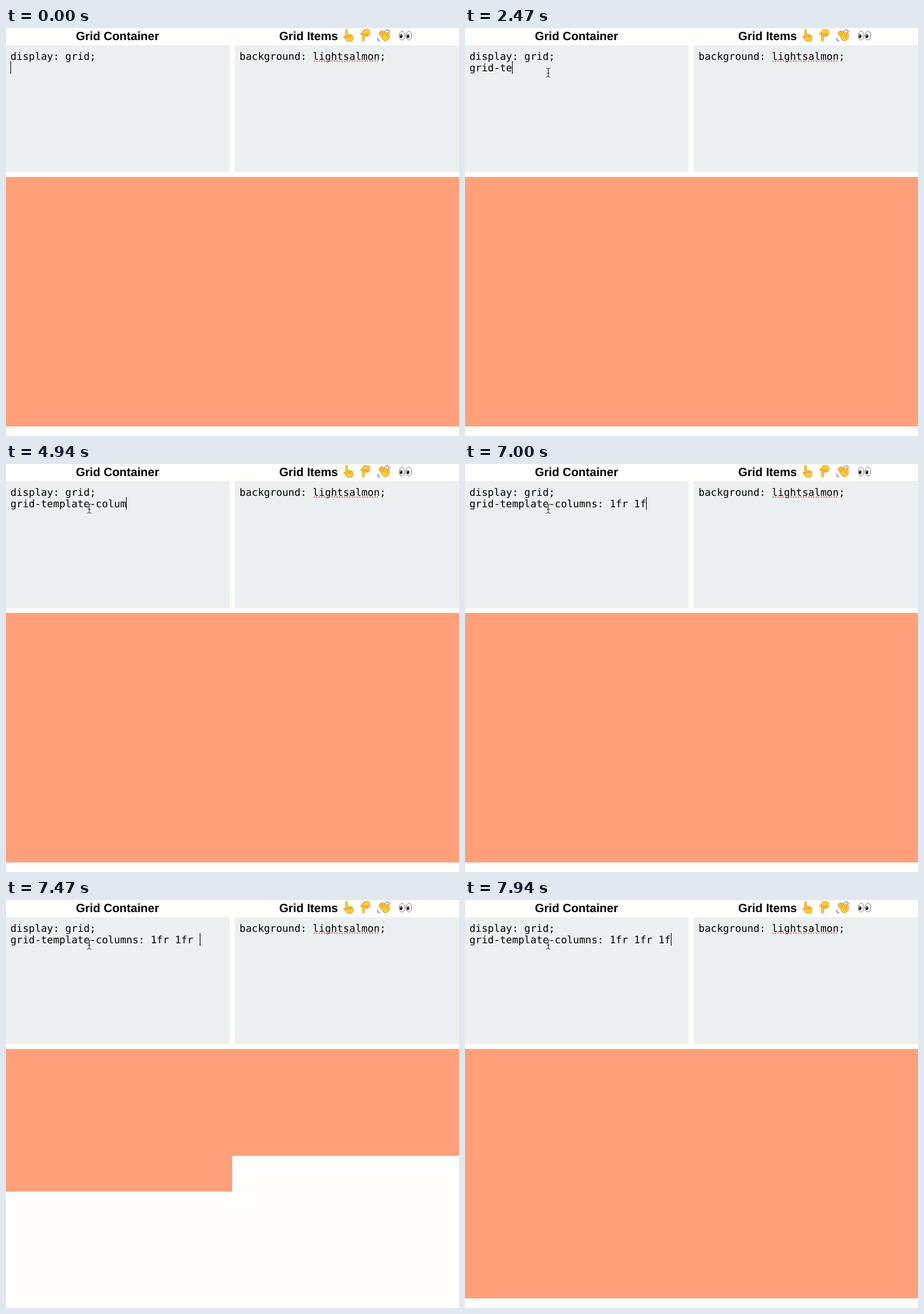
Animation of 713 by 641 pixels, one loop 8 s. Source, as an HTML page:

```html
<!DOCTYPE html>
<html lang="en">
<head>
<meta charset="utf-8">
<title>Grid playground</title>
<style>
  html, body { margin: 0; width: 100%; height: 100%; overflow: hidden; background: #fffefd; }
  svg { display: block; }
  text { white-space: pre; text-rendering: geometricPrecision; }
  .title { font: bold 18.72px "Liberation Sans", Arial, sans-serif; }
  .code { font: 15.95px "DejaVu Sans Mono", monospace; }
  .pane { fill: #ecf0f1; }
  .hand { fill: #fdc83f; stroke: #dc9a31; stroke-width: .8; stroke-linejoin: round; }
  .crease { fill: none; stroke: #c98226; stroke-width: .8; stroke-linecap: round; }
  .wave { fill: none; stroke: #6b7f8c; stroke-width: 1; stroke-linecap: round; }
</style>
</head>
<body>
<svg width="713" height="641" viewBox="0 0 713 641">
  <defs>
    <g id="point">
      <path class="hand" d="M3.4 11V2.2Q3.4.4 5.1.4T6.8 2.2V8.2Q8 7.6 9.2 8.3 10.6 7.8 11.6 8.8 13 8.4 14 9.6 15.2 9.6 15.2 11V15Q15.2 17 13.6 19H6Q4.6 17 2.6 15 .4 13 .6 11.4 1.2 10 3.4 11Z"/>
      <path class="crease" d="M6.8 8.5V12.5M9.4 8.6V12.6M12 9V12.6M3.4 11L4.8 13.6"/>
    </g>
    <g id="eye">
      <ellipse rx="4.4" ry="7" fill="#fff" stroke="#777" stroke-width=".9"/>
      <ellipse cx="-1.5" cy=".8" rx="2.1" ry="3.1" fill="#241b17"/>
      <circle cx="-1.9" cy="-.6" r=".7" fill="#fff"/>
    </g>
  </defs>

  <text class="title" x="110" y="19">Grid Container</text>
  <text class="title" x="430" y="19">Grid Items</text>
  <use href="#point" x="531" y="2"/>
  <use href="#point" transform="translate(557.5 21.3) scale(1 -1)"/>
  <g transform="translate(595 12) rotate(-35)">
    <path class="hand" d="M-5-7.2Q-3.8-9-2.6-7.2L-2.2-8.6Q-.8-10 .2-8.4L.6-7.8Q2-9 3-7.2L3.6-5Q5-6.4 6-4.8L6 1 7.2-.8Q9.2-1.4 9.2.4L6 6.6Q4 9 .6 9-4.4 9-5 4.4Z"/>
    <path class="crease" d="M-2.4-7L-1.8-.8M.5-7.6L.8-.8M3.2-5L3.4-.4M6 1Q3.4 2 3 5"/>
  </g>
  <path class="wave" d="M597 3Q601 3 603 7M600 2Q604 3 605 6M584.5 15Q585 19 589 20.5M584.5 18Q585.5 20.5 587 21"/>
  <use href="#eye" x="623.4" y="12"/>
  <use href="#eye" x="634.2" y="12"/>

  <path class="pane" d="M0 27H352V226H0ZM360 27H713V226H360Z"/>
  <text class="code" x="7" y="50">display: grid;</text>
  <text class="code" id="typed" x="7" y="68"></text>
  <text class="code" x="367.6" y="50">background: lightsalmon;</text>
  <path d="M485 52H587" stroke="#e8503e" stroke-width="2" stroke-linecap="round" stroke-dasharray="0 4"/>
  <rect id="caret" y="52" width="1" height="20"/>

  <path id="items" fill="#ffa07a"/>

  <g id="pointer" fill="none" stroke-linecap="round">
    <path id="beam" stroke="#fff" stroke-opacity=".6" stroke-width="2.4" d="M-3-7Q-.4-7 0-5.4 .4-7 3-7M0-5.4V5.6M-3 7.2Q-.4 7.2 0 5.6 .4 7.2 3 7.2M-2 1H2"/>
    <use href="#beam" id="ink"/>
    <path stroke="#333" stroke-width="1.1" d="M-3-7Q-.4-7 0-5.4 .4-7 3-7M0-5.4V5.6M-3 7.2Q-.4 7.2 0 5.6 .4 7.2 3 7.2M-2 1H2"/>
  </g>
</svg>
<script>
  const LOOP = 8000, CHAR = 9.6, LEFT = 7;
  const ITEMS = 7, ITEM_H = 56, TOP = 234, WIDTH = 713;
  const $ = id => document.getElementById(id);
  const typed = $('typed'), caret = $('caret'), items = $('items'), pointer = $('pointer');

  // Each burst of keys is spread evenly from its first to its last time; "<" is backspace.
  const keys = [];
  const type = (chars, from, to) => [...chars].forEach((key, i) =>
    keys.push({ key, at: from + (to - from) * i / Math.max(1, chars.length - 1) }));
  type('grid-te', 1590, 2470);
  type('mplate-co', 2650, 3530);
  type('l', 3650, 3650);
  type('ums', 3820, 4230);
  type('<ns: ', 4940, 5590);
  type('1fr 1', 5880, 6700);
  type('fr', 7000, 7180);
  type(' 1f', 7470, 7940);

  const textAt = t => keys.filter(k => k.at <= t + .5)
    .reduce((s, k) => k.key === '<' ? s.slice(0, -1) : s + k.key, '');

  const columns = text => {
    const value = (text.split(': ')[1] || '').trim();
    return /^\d+fr( \d+fr)*$/.test(value) ? value.split(' ').length : 1;
  };

  function layout(n) {
    let d = '';
    for (let c = 0; c < n; c++) {
      const x = Math.floor(WIDTH * c / n), right = Math.floor(WIDTH * (c + 1) / n);
      const rows = Math.ceil((ITEMS - c) / n);
      d += `M${x} ${TOP}H${right}v${rows * ITEM_H}H${x}Z`;
    }
    return d;
  }

  const bezier = (a, b, c, u) => a * (1 - u) ** 2 + 2 * b * u * (1 - u) + c * u * u;

  function movePointer(t) {
    const step = Math.min(11, Math.floor((t - 350) / 64.5));
    const u = 1 - (1 - Math.max(0, step) / 11) ** 1.5;
    pointer.style.visibility = t < 350 ? 'hidden' : 'visible';
    pointer.setAttribute('transform',
      `translate(${Math.round(bezier(262, 190, 131, u))} ${Math.round(bezier(15, 100, 70, u))})`);
  }

  function draw(t) {
    const text = textAt(t);
    const off = (t >= 970 && t < 1470) || (t >= 4590 && t < 4940);
    typed.textContent = text;
    caret.setAttribute('x', Math.round(LEFT + text.length * CHAR));
    caret.style.visibility = off ? 'hidden' : 'visible';
    items.setAttribute('d', layout(columns(text)));
    movePointer(t);
  }

  $('ink').remove();
  const start = performance.now();
  function tick() {
    draw((performance.now() - start) % LOOP);
    requestAnimationFrame(tick);
  }
  tick();
</script>
</body>
</html>
```
